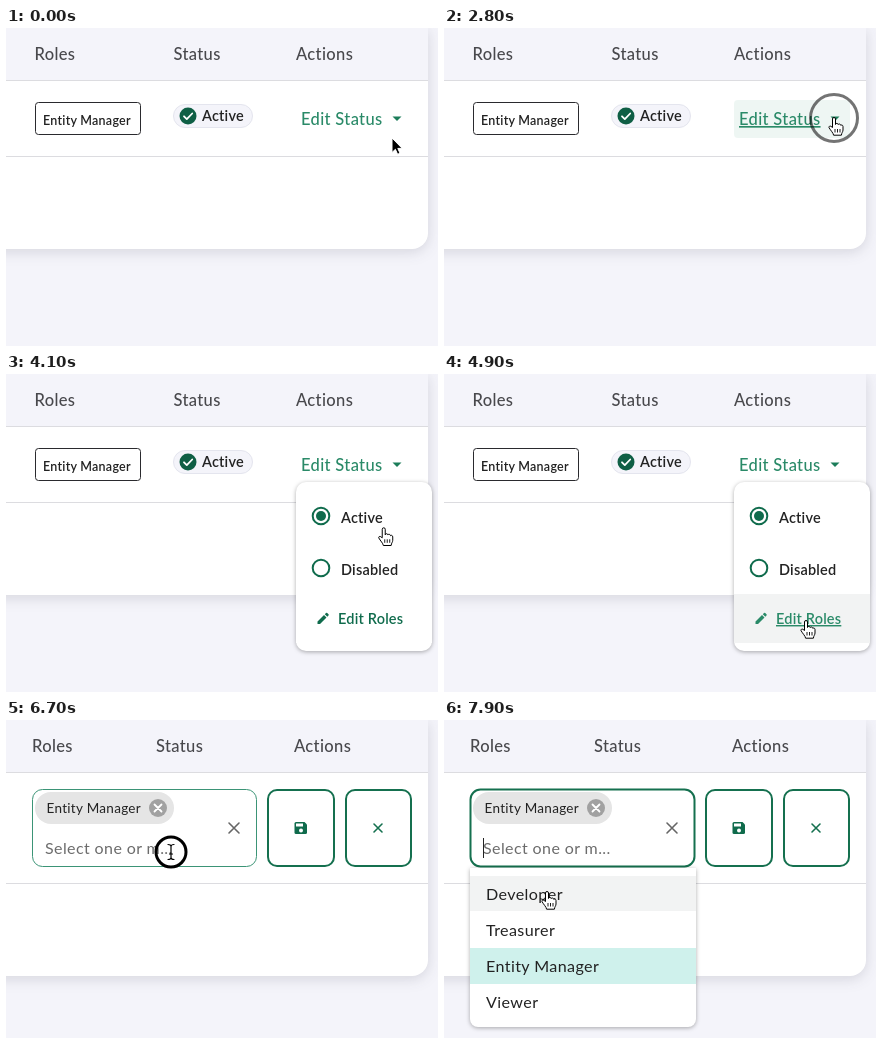
These frames come from a looping animation (432 by 318 pixels, 8000 ms). An HTML page:

```html
<!DOCTYPE html>
<html lang="en">
<head>
<meta charset="utf-8">
<title>Edit roles</title>
<style>
  html, body { margin: 0; width: 100%; height: 100%; overflow: hidden; background: #f4f4fa; }
  svg { display: block; width: 432px; height: 318px; }
  text { font: 500 16.1px Lato, "Open Sans", sans-serif; letter-spacing: .4px; fill: #222; white-space: pre; }
  .head text { font-size: 16.5px; letter-spacing: .35px; fill: #48484c; }
  .link { font-size: 16.5px; letter-spacing: .35px; fill: #2a8a68; }
  .bold { font-size: 14.5px; font-weight: 600; letter-spacing: .2px; }
  .tag { font-size: 12.5px; font-weight: 600; letter-spacing: .25px; }
  .chip { font-size: 13.5px; font-weight: 400; letter-spacing: .3px; }
  .hint { font-size: 16px; font-weight: 400; fill: #6c6c6c; }
  .list text { font-weight: 400; }
  .under { text-decoration: underline; text-decoration-thickness: 1px; text-underline-offset: 2px; }
  .soft { filter: drop-shadow(0 3px 7px rgba(40, 40, 60, .15)); }
  .pop { filter: drop-shadow(0 1px 2px rgba(0, 0, 0, .32)); }
  .line { fill: none; stroke-linecap: round; stroke-linejoin: round; }
</style>
</head>
<body>
<svg viewBox="0 0 432 318">
  <rect width="432" height="318" fill="#f4f4fa"/>
  <g class="soft"><path id="card" fill="#fff"/></g>
  <path d="M0 0H422V52H0Z" fill="#f4f4fa"/>
  <path d="M0 52.5H422" stroke="#dcdce0"/>
  <path id="rule" d="M0 .5H422" stroke="#dcdce0"/>
  <g class="head">
    <text id="roles" y="32">Roles</text>
    <text id="status" y="32">Status</text>
    <text id="actions" y="32">Actions</text>
  </g>

  <g id="view">
    <rect x="29.5" y="74.5" width="105" height="32" rx="3" fill="#fff" stroke="#2a2a2e"/>
    <text class="tag" x="37" y="97">Entity Manager</text>
    <rect x="167.5" y="76.5" width="79" height="23" rx="11.5" fill="#f4f4fa" stroke="#e4e5ee"/>
    <circle cx="182" cy="88" r="8.5" fill="#0f5f45"/>
    <path class="line" d="M178 88.3l2.8 2.8l5.4-5.6" stroke="#fff" stroke-width="1.8"/>
    <text class="bold" x="196" y="93">Active</text>
    <rect id="press" x="290" y="72" width="116" height="38" rx="4" fill="#2a8a68"/>
    <text id="edit" class="link" x="295" y="97">Edit Status</text>
    <path d="M386.5 88.5h9l-4.5 4.5z" fill="#1c7d5a"/>
  </g>

  <g id="form">
    <rect id="field" x="26.5" y="69.5" width="224" height="77" rx="10" fill="#fff"/>
    <rect x="29" y="72" width="139" height="32" rx="16" fill="#e5e5e5"/>
    <text class="chip" x="40.500" y="93">Entity Manager</text>
    <circle cx="152" cy="88" r="9" fill="#a1a1a1"/>
    <path class="line" d="M148.500 84.500l7 7m0-7l-7 7" stroke="#fff" stroke-width="1.8"/>
    <text class="hint" x="39" y="134">Select one or m...</text>
    <path id="caret" d="M39.500 118V138" stroke="#222"/>
    <path id="clear" class="line" d="M223 103l10 10m0-10l-10 10" stroke="#666" stroke-width="1.600"/>
    <g fill="#fff" stroke="#15704f" stroke-width="2">
      <rect x="262" y="70" width="66" height="76" rx="9"/>
      <rect x="340" y="70" width="65" height="76" rx="9"/>
    </g>
    <path d="M290 102h8.500l2.500 2.500v8a1.500 1.500 0 0 1-1.500 1.500h-9.500a1.500 1.500 0 0 1-1.500-1.500v-9a1.500 1.500 0 0 1 1.500-1.500z" fill="#0f6b4c"/>
    <path d="M290 103.500h7v3h-7z" fill="#fff"/>
    <circle cx="295" cy="110.500" r="2" fill="#fff"/>
    <path class="line" d="M368 104l8 8m0-8l-8 8" stroke="#15704f" stroke-width="1.600"/>
  </g>

  <g id="menu">
    <rect class="pop" x="290" y="108" width="136" height="169" rx="10" fill="#fff"/>
    <rect id="row" x="290" y="220" width="136" height="49"/>
    <g fill="none" stroke="#0f6b4c" stroke-width="2">
      <circle cx="315" cy="142" r="8.300"/>
      <circle cx="315" cy="194" r="8.300"/>
    </g>
    <circle cx="315" cy="142" r="5" fill="#0f6b4c"/>
    <text class="bold" x="335" y="149">Active</text>
    <text class="bold" x="335" y="201">Disabled</text>
    <g id="item">
      <path d="M311.500 247.500l6.500-6.500l2.500 2.500l-6.500 6.500h-2.500zM318.800 240.200l1.200-1.200q.6-.5 1.200 0l1.300 1.300q.5.600 0 1.200l-1.200 1.200z"/>
      <text id="itemText" class="bold" x="332" y="250" style="fill:inherit">Edit Roles</text>
    </g>
  </g>

  <g id="list" class="list">
    <path class="pop" d="M26 148H252V299a8 8 0 0 1-8 8H34a8 8 0 0 1-8-8Z" fill="#fff"/>
    <rect id="hover" x="26" y="156" width="226" height="35" fill="#f2f3f3"/>
    <rect x="26" y="228" width="226" height="36" fill="#cff1ec"/>
    <text x="42" y="180">Developer</text>
    <text x="42" y="216">Treasurer</text>
    <text x="42" y="252">Entity Manager</text>
    <text x="42" y="288">Viewer</text>
  </g>

  <circle id="ring" fill="none" stroke="#000" stroke-width="3"/>
  <g id="cursor">
    <path id="arrow" d="M0 0V14.500L3.400 11.300L5.600 16.300L8 15.200L5.800 10.400H10.200Z" stroke="#fff" stroke-linejoin="round"/>
    <g id="hand" stroke="#000" stroke-linejoin="round">
      <path d="M-1.500 9.500V1A1.500 1.500 0 0 1 1.500 1V6.500C1.600 5 4 5 4.200 6.600C4.600 5.600 6.600 5.800 6.800 7.400C7.400 6.600 9 7 9 8.600V12C9 14 7.600 14.600 7.400 17.200H-.4C-.6 15-3.400 12.500-5 9.600C-5.400 8.400-4 7.600-3 8.400Z" fill="#fff"/>
      <path d="M1 11v3.500M3.500 11v3.500M6 11v3.500" stroke-width=".9"/>
    </g>
    <path id="beam" class="line" d="M-3-7.500Q0-7.500 0-5.500Q0-7.500 3-7.500M0-5.500V5.500M-3 7.500Q0 7.500 0 5.500Q0 7.500 3 7.500M-1.500 2H1.500" stroke="#000" stroke-width="1.200"/>
  </g>
</svg>
<script>
const LOOP = 8000, STEP = 100;
const OPEN = 2810, CLOSE = 5408, LIST = 6800;
const CLICKS = [2700, 5300, 6700];
// time, x, y of the pointer's hot spot
const PATH = [
  [0, 386, 110], [800, 386, 110], [1500, 390, 90], [2800, 390, 90],
  [2900, 389, 88], [3700, 389, 88], [4600, 362, 247], [6000, 362, 247],
  [6600, 165, 132], [7200, 165, 132], [7900, 103, 172], [LOOP, 103, 172]
];

const $ = id => document.getElementById(id);
const set = (id, attrs) => {
  for (const key in attrs) $(id).setAttribute(key, attrs[key]);
};
const show = (id, on) => { $(id).style.display = on ? "" : "none"; };
const smooth = p => {
  p = Math.min(1, Math.max(0, p));
  return p * p * (3 - 2 * p);
};

function pointer(t) {
  const i = PATH.findIndex(k => k[0] > t);
  const [t0, x0, y0] = PATH[i - 1], [t1, x1, y1] = PATH[i];
  const e = smooth((t - t0) / (t1 - t0));
  return [x0 + (x1 - x0) * e, y0 + (y1 - y0) * e];
}

function cursorKind(t, y) {
  if (t < 2900) return y < 109 ? "hand" : "arrow";
  if (t < CLOSE) return y > 118 ? "hand" : "arrow";
  if (t < 6100) return "hand";
  if (y < 147) return "beam";
  return t >= LIST && y > 156 ? "hand" : "arrow";
}

function drawPage(editing) {
  const bottom = editing ? 256 : 221;
  set("card", { d: `M-20 0H422V${bottom - 16}a16 16 0 0 1-16 16H-20Z` });
  set("rule", { transform: `translate(0 ${editing ? 163 : 128})` });
  set("roles", { x: editing ? 26 : 28.5 });
  set("status", { x: editing ? 150 : 167.5 });
  set("actions", { x: editing ? 288 : 290 });
  show("view", !editing);
  show("form", editing);
}

function drawMenu(t, y) {
  const leaving = t >= CLOSE;
  const dt = t - (leaving ? CLOSE : OPEN);
  const on = t >= OPEN && t < CLOSE + 270;
  show("menu", on);
  if (!on) return;
  const fade = smooth(dt / 270);
  const grow = smooth((leaving ? dt - 90 : dt) / 180);
  const s = leaving ? 1 - .25 * grow : .75 + .25 * grow;
  set("menu", {
    opacity: leaving ? (1 - fade) ** 1.5 : fade,
    transform: `translate(290 108) scale(${s} ${s * s}) translate(-290 -108)`
  });
  const over = y > 220;
  set("row", { fill: t >= 5300 ? "#dce9e5" : over ? "#f2f3f3" : "#fff" });
  set("item", { fill: over ? "#2a8a68" : "#0f6b4c" });
  $("itemText").classList.toggle("under", over);
}

function drawForm(t, y) {
  const focus = t >= LIST;
  const over = focus || (t > 6100 && y < 147);
  set("field", {
    stroke: focus ? "#15704f" : over ? "#3b9476" : "#bcbcbc",
    "stroke-width": focus ? 2 : 1
  });
  show("clear", over);
  show("caret", focus && (t - LIST) % 1000 < 500);
  show("list", focus);
  show("hover", y > 156);
}

function drawPointer(t, x, y) {
  const kind = cursorKind(t, y);
  for (const id of ["arrow", "hand", "beam"]) show(id, id === kind);
  set("cursor", { transform: `translate(${x} ${y})` });
  const click = CLICKS.find(c => t >= c && t < c + 220);
  show("ring", click !== undefined);
  if (click === undefined) return;
  const dt = t - click;
  set("ring", { cx: x, cy: y, r: 15 + dt * .085, opacity: 1 - dt / 220 });
}

function render(t) {
  const [x, y] = pointer(t);
  drawPage(t >= CLOSE);
  $("edit").classList.toggle("under", t < 2900 && y < 109);
  set("press", { opacity: t < 2700 ? 0 : .08 * (1 - smooth((t - 3150) / 350)) });
  drawMenu(t, y);
  drawForm(t, y);
  drawPointer(t, x, y);
}

const start = performance.now();
function tick() {
  const t = (performance.now() - start) % LOOP;
  render(Math.floor(t / STEP) * STEP);
  requestAnimationFrame(tick);
}
tick();
</script>
</body>
</html>
```
